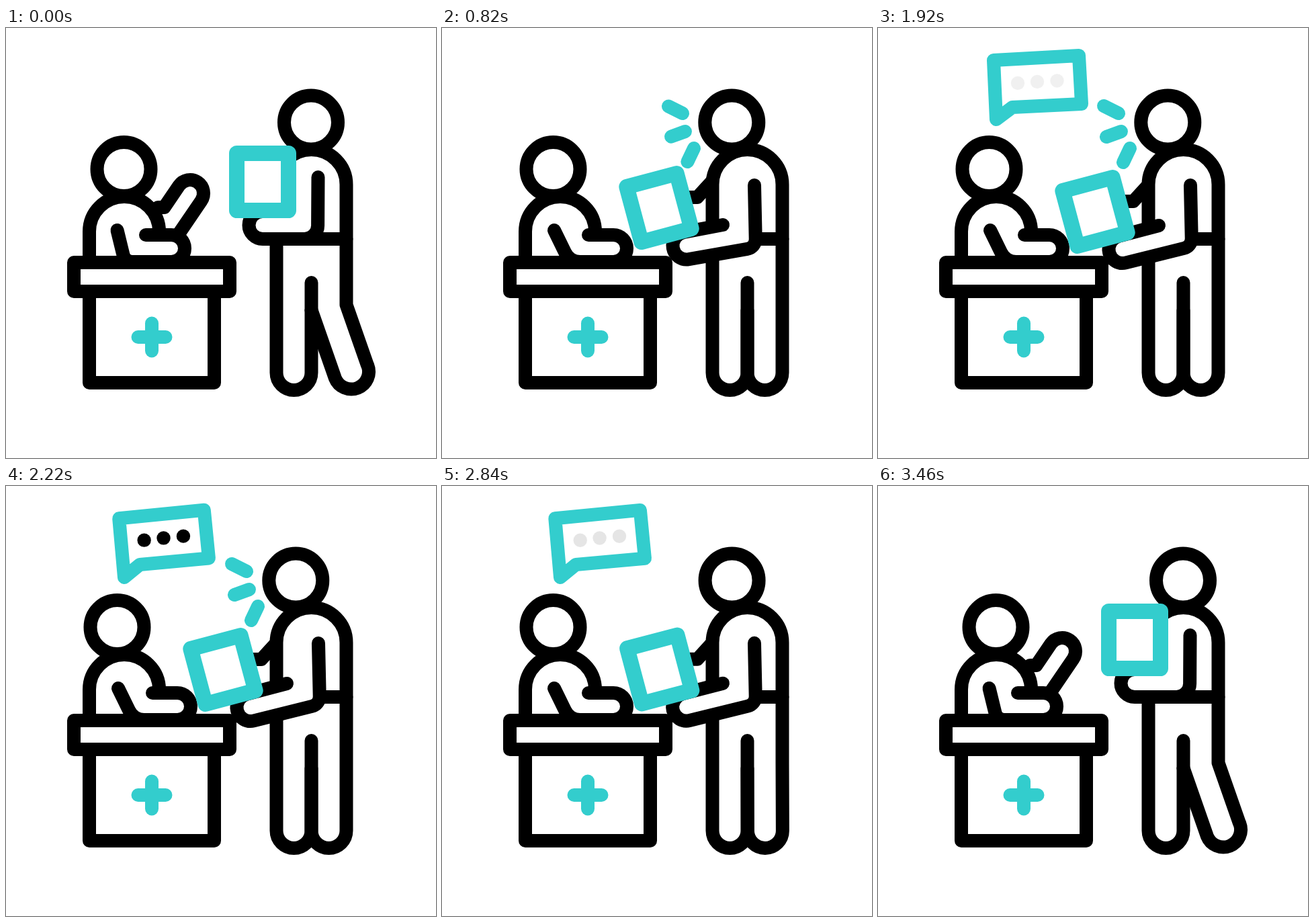
Animation, 640 px wide and 640 px high, one loop 3.6 s. Source, as an HTML page with a canvas:

```html
<!DOCTYPE html>
<html lang="en">
<head>
<meta charset="utf-8">
<title>Reception desk</title>
<style>
  html, body { margin: 0; height: 100%; overflow: hidden; background: #fff; }
  canvas { display: block; }
</style>
</head>
<body>
<canvas id="stage" width="640" height="640"></canvas>
<script>
const ctx = document.getElementById('stage').getContext('2d');
const LOOP = 3600, BLACK = '#000', TEAL = '#33cdcd';

const mix = (a, b, k) => a + (b - a) * k;
const ramp = (t, from, to) => {
  const k = Math.min(1, Math.max(0, (t - from) / (to - from)));
  return k < 0.5 ? 2 * k * k : 1 - 2 * (1 - k) * (1 - k);
};

function ink(color = BLACK, width = 20) {
  ctx.strokeStyle = color;
  ctx.lineWidth = width;
  ctx.stroke();
}

function fillInk(color, width) {
  ctx.fillStyle = '#fff';
  ctx.fill();
  ink(color, width);
}

function line(...points) {
  ctx.beginPath();
  points.forEach(([x, y]) => ctx.lineTo(x, y));
}

function head(x, y) {
  ctx.beginPath();
  ctx.arc(x, y, 40, 0, 2 * Math.PI);
  fillInk();
}

function torso(x, y, bottom) {
  ctx.beginPath();
  ctx.moveTo(x - 52, bottom);
  ctx.arc(x, y, 52, Math.PI, 0);
}

function drawReceptionist(r) {
  if (r < 1) {
    const dx = -90 * r, dy = 60 * r;
    ctx.beginPath();
    ctx.moveTo(226 + dx, 267 + dy);
    ctx.lineTo(235.5 + dx, 267 + dy);
    ctx.arc(274 + dx, 246 + dy, 20, Math.PI + 0.6, 0.6);
    ctx.lineTo(256 + dx, 308 + dy);
    fillInk();
  }
  torso(176, 303, 350);
  fillInk();
  head(mix(175.5, 165.5, r), 210);

  const hand = mix(246, 255, r);
  ctx.beginPath();
  ctx.moveTo(mix(165.5, 167, r), 301);
  ctx.arcTo(mix(177, 190, r), 348, hand, 348, mix(14, 25, r));
  ctx.arc(hand, 328, 20, Math.PI / 2, -Math.PI / 2, true);
  ctx.lineTo(mix(208, 218, r), 308);
  fillInk();
}

function drawDesk() {
  ctx.beginPath();
  ctx.rect(124, 392, 186, 136);
  fillInk();
  ctx.beginPath();
  ctx.rect(101, 349, 232, 43);
  fillInk();
  line([196.5, 460], [237.5, 460]);
  ink(TEAL);
  line([217, 439.5], [217, 480.5]);
  ink(TEAL);
}

function drawPatient(p, lift) {
  const elbowX = mix(390, 380, p), elbowY = mix(235, 258, p) - 6 * lift;
  line([elbowX - 20, elbowY], [elbowX, elbowY], [402, elbowY - 24]);
  ink();

  torso(454.5, 233, 314);
  ctx.lineTo(506.5, 314);
  ctx.closePath();
  fillInk();

  // Right leg swings between striding and standing
  const heel = [mix(490, 454.5, p), mix(521, 513, p)];
  const toe = [mix(538, 506.5, p), mix(502, 513, p)];
  const tilt = Math.atan2(toe[1] - heel[1], toe[0] - heel[0]);
  ctx.beginPath();
  ctx.moveTo(506.5, 314);
  ctx.lineTo(506.5, 412);
  ctx.lineTo(...toe);
  ctx.arc((heel[0] + toe[0]) / 2, (heel[1] + toe[1]) / 2, 26, tilt, tilt + Math.PI);
  ctx.lineTo(454.5, 420);
  ink();

  ctx.beginPath();
  ctx.moveTo(402.5, 314);
  ctx.arc(428.5, 513, 26, Math.PI, 0, true);
  ctx.lineTo(454.5, 379);
  ink();
  head(mix(454, 431.3, p), 140.5);

  // Near arm
  const a = (-14 * p + 4 * lift) * Math.PI / 180;
  const x = mix(382, 364, p) - 45 * p * (1 - p);
  const y = mix(293.5, 329.5, p) - 5.5 * lift;
  const cornerX = mix(464, 467, p);
  const cornerY = y + 20.5 / Math.cos(a) + (cornerX - x) * Math.tan(a);
  const down = a + Math.PI / 2;
  ctx.beginPath();
  ctx.moveTo(mix(464.5, 465, p), mix(222, 234, p));
  ctx.arcTo(cornerX, cornerY, x + 20.5 * Math.cos(down), y + 20.5 * Math.sin(down), mix(20, 15, p));
  ctx.arc(x, y, 20.5, down, down + Math.PI);
  ctx.lineTo(mix(413, 418, p), mix(273, 294, p) - lift);
  fillInk();
}

function drawPaper(p, lift) {
  ctx.save();
  ctx.translate(mix(382, 323, p), mix(229, 273.5, p) - 6 * lift);
  ctx.rotate(-15 * p * Math.PI / 180);
  ctx.beginPath();
  ctx.rect(-38.5, -42.5, 77, 85);
  fillInk(TEAL, 23);
  ctx.restore();
}

function drawSparks(t) {
  const k = ramp(t, 600, 860) - ramp(t, 2560, 2800);
  if (k <= 0) return;
  for (const [x, y, dx, dy] of [[358, 127, -22, -11], [362, 154, -22, 8], [375, 179, -10, 21]]) {
    line([x, y], [x + dx * k, y + dy * k]);
    ink(TEAL);
  }
}

function drawBubble(t) {
  const size = ramp(t, 1420, 1760) - ramp(t, 3160, 3420);
  if (size <= 0) return;
  let angle = 13 - 21 * ramp(t, 1440, 1730) + 8 * ramp(t, 1730, 1920);
  if (t > 1920) angle -= 1.25 * (1 - Math.cos((t - 1920) / 640 * 2 * Math.PI));
  angle += 13 * ramp(t, 3160, 3420);
  const c = Math.cos(angle * Math.PI / 180) * size, s = Math.sin(angle * Math.PI / 180) * size;
  // Points are relative to the tail tip; the stroke keeps its weight
  const place = ([x, y]) => [176 + x * c - y * s, 136 + x * s + y * c];

  line(...[[0, 0], [-4, -88], [123, -95], [127, -23], [24, -18]].map(place));
  ctx.closePath();
  fillInk(TEAL);

  ctx.globalAlpha = ramp(t, 1880, 2120) - ramp(t, 2640, 2900);
  ctx.fillStyle = BLACK;
  for (const dot of [[32, -54], [61, -56], [90.5, -57.5]]) {
    ctx.beginPath();
    ctx.arc(...place(dot), 10.2, 0, 2 * Math.PI);
    ctx.fill();
  }
  ctx.globalAlpha = 1;
}

function draw(now) {
  const t = now % LOOP;
  const receptionist = ramp(t, 20, 440) - ramp(t, 3060, 3440);
  const patient = ramp(t, 40, 520) - ramp(t, 2790, 3450);
  const lift = patient * (1 - ramp(t, 810, 1300));

  ctx.fillStyle = '#fff';
  ctx.fillRect(0, 0, 640, 640);
  ctx.lineCap = ctx.lineJoin = 'round';
  drawReceptionist(receptionist);
  drawPatient(patient, lift);
  drawDesk();
  drawPaper(patient, lift);
  drawSparks(t);
  drawBubble(t);
  requestAnimationFrame(draw);
}

requestAnimationFrame(draw);
</script>
</body>
</html>
```
